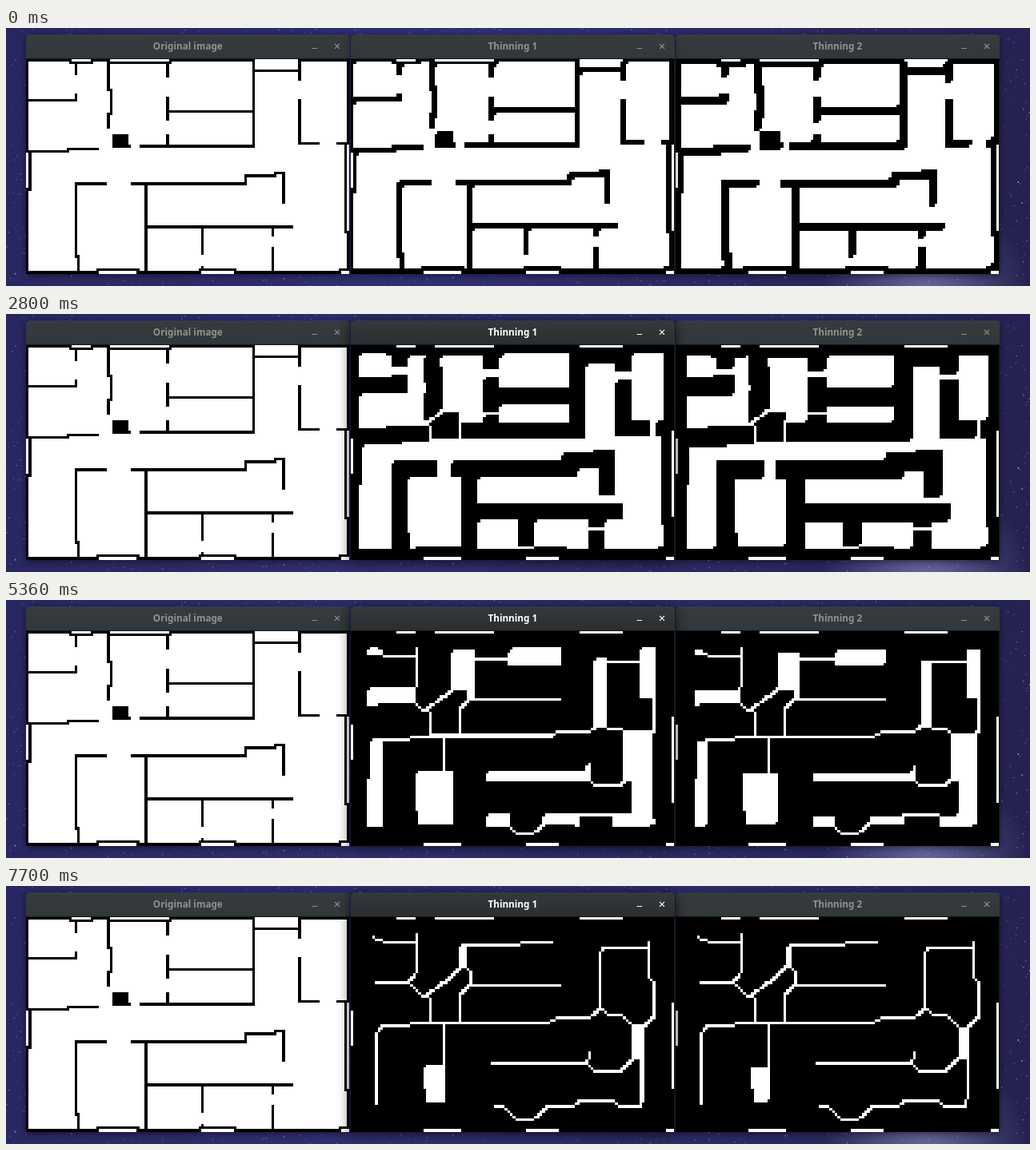
Write an HTML page with a canvas that moves like this. It is 1280 by 323 pixels and loops after 8000 ms.

```html
<!DOCTYPE html>
<html lang="en">
<head>
<meta charset="utf-8">
<title>Thinning</title>
<style>
html, body { margin: 0; width: 100%; height: 100%; overflow: hidden; background: #29275f; }
canvas { display: block; }
</style>
</head>
<body>
<canvas id="stage" width="1280" height="323"></canvas>
<script>
const LOOP = 8000, TICK = 233, COLS = 120, ROWS = 80;
const ctx = document.getElementById('stage').getContext('2d');

function makeCanvas(width, height) {
  const canvas = document.createElement('canvas');
  canvas.width = width;
  canvas.height = height;
  return canvas;
}

// Walls as strokes one cell wide, from corner to corner.
const OUTER = 'M0 0H119V79H0Z M16 1H24 M30 1H53 M1 34V48 M118 31V64 M26 78H41 M64 78H77 M116 78H119';
const OPENINGS = 'M17 0H23 M31 0H52 M85 0H100 M0 35V47 M119 32V63 M27 79H40 M65 79H76 M117 79H119';
const UPPER_ROOMS = 'M18 1V5 M18 13V15H0 M30 1V11H31V20H30V25 M52 1V6 M52 14V22 M52 28V32 M52 19H84' +
  'M84 0V32H42 M84 4H101 M101 0V7 M101 15V31H108 M115 31H119 M0 34H15V33H26 M32 32H38';
const LOWER_ROOMS = 'M29 46H18V73H19V78 M39 46H81V43H92V42H95V53 M44 46V79' +
  'M44 62H98 M65 62V72 M65 77V78 M91 62V65 M91 70V79';

// Cells of the floor plan: 1 is white, 0 is wall.
function buildPlan() {
  const g = makeCanvas(COLS, ROWS).getContext('2d');
  const stroke = (color, path) => {
    g.strokeStyle = color;
    g.stroke(new Path2D(path));
  };
  g.fillStyle = '#fff';
  g.fillRect(0, 0, COLS, ROWS);
  g.fillStyle = '#000';
  g.fillRect(32, 28, 6, 5);
  g.translate(0.5, 0.5);
  g.lineCap = 'square';
  stroke('#000', OUTER + UPPER_ROOMS + LOWER_ROOMS);
  stroke('#fff', OPENINGS);
  const pixels = g.getImageData(0, 0, COLS, ROWS).data;
  return Uint8Array.from({ length: COLS * ROWS }, (_, i) => pixels[4 * i] > 127 ? 1 : 0);
}

// One Zhang-Suen sub-iteration; the outermost cells are never touched.
function thin(grid, second) {
  const next = grid.slice();
  const ring = [-COLS, 1 - COLS, 1, COLS + 1, COLS, COLS - 1, -1, -COLS - 1];
  for (let r = 1; r < ROWS - 1; r++) {
    for (let c = 1; c < COLS - 1; c++) {
      const i = r * COLS + c;
      if (!grid[i]) continue;
      const p = ring.map(offset => grid[i + offset]);
      const count = p.reduce((sum, v) => sum + v, 0);
      if (count < 2 || count > 6) continue;
      const rises = p.filter((v, k) => !v && p[(k + 1) % 8]).length;
      if (rises !== 1) continue;
      const [n, , e, , s, , w] = p;
      if (second ? !(n && e && w) && !(n && s && w) : !(n && e && s) && !(e && s && w)) next[i] = 0;
    }
  }
  return next;
}

function toBitmap(grid) {
  const canvas = makeCanvas(COLS, ROWS);
  const g = canvas.getContext('2d');
  g.fillRect(0, 0, COLS, ROWS);
  g.fillStyle = '#fff';
  grid.forEach((v, i) => v && g.fillRect(i % COLS, Math.floor(i / COLS), 1, 1));
  return canvas;
}

const grids = [buildPlan()];
for (let step = 0; step < 18; step++) grids.push(thin(grids[step], step % 2 === 1));
const bitmaps = grids.map(toBitmap);

// Number of refreshes so far; they fall on whole ticks and come slightly faster as the shapes shrink.
function refreshes(t, start, pace, gain) {
  let n = 0;
  while (n < 8 && t >= TICK * Math.floor(start + pace * n - gain * n * n)) n++;
  return n;
}

function buildSky() {
  const canvas = makeCanvas(1280, 323);
  const g = canvas.getContext('2d');
  const fill = g.createLinearGradient(0, 0, 1280, 323);
  fill.addColorStop(0, '#27265f');
  fill.addColorStop(0.45, '#302f72');
  fill.addColorStop(1, '#24214f');
  g.fillStyle = fill;
  g.fillRect(0, 0, 1280, 323);
  const glow = g.createRadialGradient(1150, 335, 0, 1150, 335, 130);
  glow.addColorStop(0, 'rgba(150,150,205,0.6)');
  glow.addColorStop(1, 'rgba(150,150,205,0)');
  g.fillStyle = glow;
  g.fillRect(1000, 200, 280, 123);
  let seed = 7;
  const random = () => (seed = seed * 16807 % 2147483647) / 2147483647;
  for (let i = 0; i < 7000; i++) {
    const size = random() < 0.08 ? 1.6 : 1;
    g.fillStyle = `rgba(190,200,250,${0.06 + 0.8 * random() ** 4})`;
    g.fillRect(random() * 1280, random() * 323, size, size);
  }
  return canvas;
}
const sky = buildSky();

function drawWindow(index, title, bitmap, focus) {
  const x = 25 + 406 * index;
  ctx.save();
  ctx.shadowColor = `rgba(0,0,0,${0.5 + 0.25 * focus})`;
  ctx.shadowBlur = 8 + 8 * focus;
  ctx.shadowOffsetY = 2;
  ctx.fillStyle = '#15181a';
  ctx.beginPath();
  ctx.roundRect(x, 8, 405, 300, [5, 5, 0, 0]);
  ctx.fill();
  ctx.restore();

  const bar = ctx.createLinearGradient(0, 8, 0, 38);
  bar.addColorStop(0, focus ? '#35393b' : '#363c3e');
  bar.addColorStop(1, focus ? '#2a2e30' : '#31373a');
  ctx.fillStyle = bar;
  ctx.beginPath();
  ctx.roundRect(x, 8, 405, 30, [5, 5, 0, 0]);
  ctx.fill();

  const level = Math.round(146 + 109 * focus);
  ctx.fillStyle = ctx.strokeStyle = `rgb(${level},${level},${level})`;
  ctx.fillText(title, x + 202.3, 27.3);
  ctx.lineWidth = 1.2;
  ctx.beginPath();
  ctx.moveTo(x + 357.5, 25.5);
  ctx.lineTo(x + 364, 25.5);
  ctx.moveTo(x + 386, 19.8);
  ctx.lineTo(x + 392, 25.8);
  ctx.moveTo(x + 392, 19.8);
  ctx.lineTo(x + 386, 25.8);
  ctx.stroke();

  ctx.drawImage(bitmap, x + 0.04, 38.63, 404.4, 269.2);
}

function draw(t) {
  const focus = t < 230 ? 0 : t < 470 ? 0.8 : 1;
  ctx.imageSmoothingEnabled = false;
  ctx.font = 'bold 11.7px "Noto Sans", sans-serif';
  ctx.textAlign = 'center';
  ctx.drawImage(sky, 0, 0);
  drawWindow(0, 'Original image', bitmaps[0], 0);
  drawWindow(2, 'Thinning 2', bitmaps[2 + 2 * refreshes(t, 8.3, 4.05, 0.058)], 0);
  drawWindow(1, 'Thinning 1', bitmaps[1 + 2 * refreshes(t, 5.99, 4.07, 0.031)], focus);
}

const start = performance.now();
function tick() {
  draw((performance.now() - start) % LOOP);
  requestAnimationFrame(tick);
}
tick();
</script>
</body>
</html>
```
